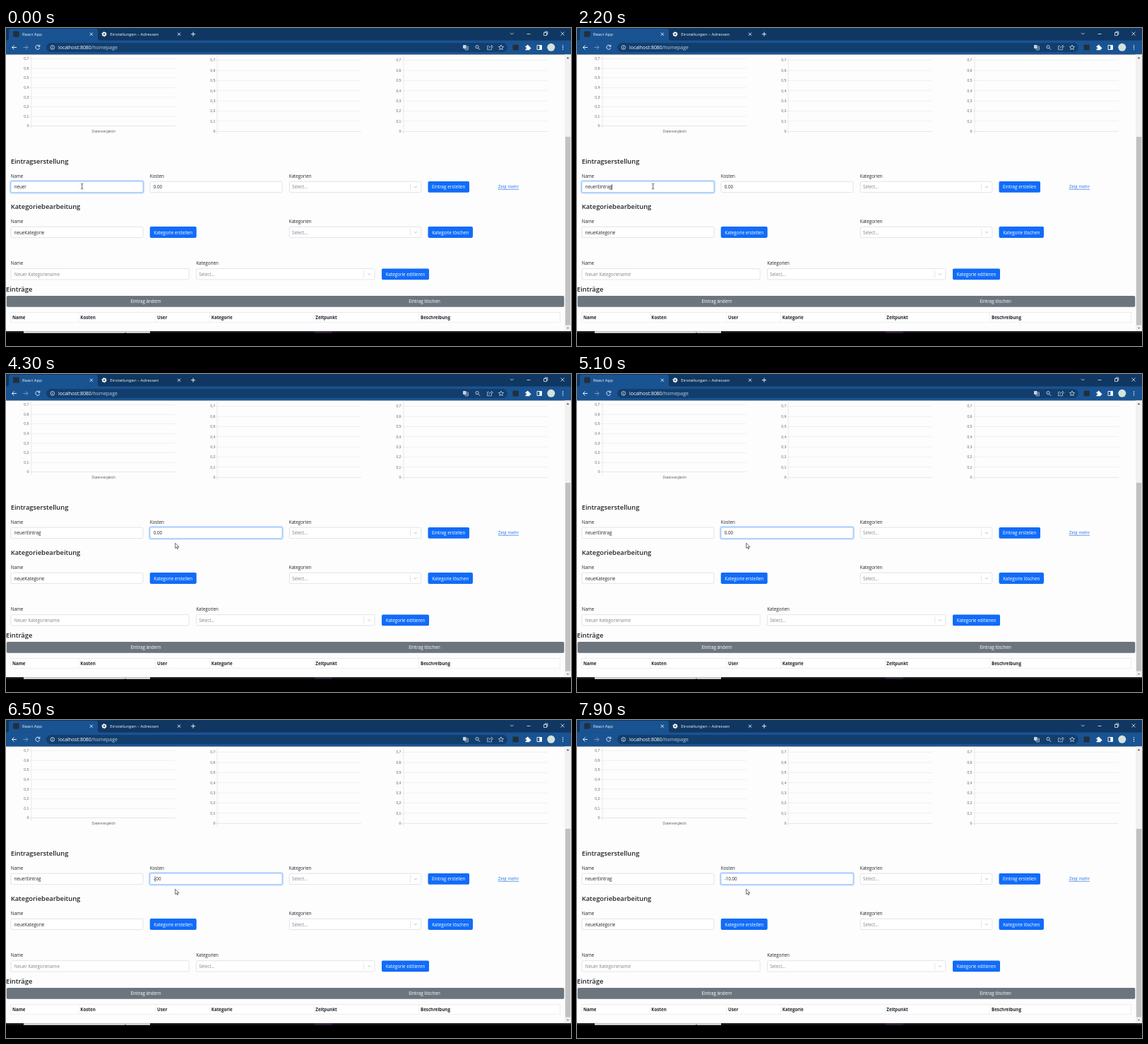
Animation, 800 px wide and 450 px high, one loop 8 s. Source, as an HTML page:

```html
<!DOCTYPE html>
<html lang="de">
<head>
<meta charset="utf-8">
<title>Eintragserstellung</title>
<style>
html, body { margin: 0; width: 100%; height: 100%; overflow: hidden; background: #000; }
svg { display: block; width: 800px; height: 450px; }
text { font: 6.25px "Open Sans", "Noto Sans", sans-serif; fill: #212529; white-space: pre; }
.head { font-size: 9.35px; font-weight: 600; }
.bold { font-size: 6.2px; font-weight: 700; }
.light { fill: #fff; }
.hint { fill: #808489; }
.link { fill: #2f78ee; text-decoration: underline .5px; }
.tab { font-size: 5.95px; fill: #f4f8fc; }
.url { font-size: 6.95px; fill: #fff; }
.axis { font: 5px "Liberation Sans", Arial, sans-serif; fill: #666; }
.mid { text-anchor: middle; }
.end { text-anchor: end; }
.icon { fill: none; stroke: #e4edf6; stroke-width: 1; }
</style>
</head>
<body>
<svg id="stage" viewBox="0 0 800 450"></svg>
<script>
const NS = "http://www.w3.org/2000/svg";
const stage = document.getElementById("stage");

function add(tag, attrs, content) {
  const el = document.createElementNS(NS, tag);
  for (const key in attrs) el.setAttribute(key, attrs[key]);
  if (content !== undefined) el.textContent = content;
  return stage.appendChild(el);
}
const box = (x, y, width, height, fill, more) => add("rect", { x, y, width, height, fill, ...more });
const text = (x, y, str, cls = "") => add("text", { x, y, class: cls }, str);
const icon = (d, more) => add("path", { d, class: "icon", ...more });
const dot = (cx, cy, r, fill) => add("circle", { cx, cy, r, fill });

function field(x, y, w, str, cls) {
  const frame = box(x + .25, y + .25, w - .5, 15.3, "#fff", { rx: 1.7, stroke: "#ced4da", "stroke-width": .6 });
  return { frame, label: text(x + 5, y + 10.4, str, cls) };
}
function select(x, y, w) {
  field(x, y, w, "Select...", "hint").label.setAttribute("x", x + 4);
  const right = x + w;
  box(right - 15.6, y + 3, .5, 10, "#ccc");
  icon(`M${right - 10} ${y + 7}l2 2l2 -2`, { style: "stroke:#bbb;stroke-width:.9" });
}
function button(x, y, w, str) {
  box(x, y, w, 15.8, "#116cf8", { rx: 1.8 });
  text(x + w / 2, y + 10.4, str, "light mid");
}

function browser() {
  box(0, 0, 800, 20, "#0f3761");
  add("path", { d: "M0 18Q4 18 4 14V4Q4 1 7 1H127Q130 1 130 4V14Q130 18 134 18Z", fill: "#1a5391" });
  box(0, 17.5, 800, 20, "#1a5391");
  box(57, 21, 653, 13, "#123e6e", { rx: 6.5 });

  box(10.2, 4.6, 8.4, 8.2, "#22303c", { rx: 1 });
  text(23, 11.2, "React App", "tab");
  add("circle", { cx: 139, cy: 8.7, r: 2, class: "icon", style: "stroke:#fff;stroke-width:1.7" });
  add("circle", { cx: 139, cy: 8.7, r: 3.2, class: "icon", "stroke-dasharray": "1.6 1.75" });
  text(147.3, 11.2, "Einstellungen – Adressen", "tab");
  for (const x of [120.8, 245]) icon(`M${x - 2} 6.7l4 4m0 -4l-4 4`);
  icon("M262 8.7h6m-3 -3v6");

  icon("M714 6.8l2.3 2.3l2.3 -2.3", { style: "stroke-width:.8" });
  icon("M737.5 8.5h5M761.5 6.5h4v4h-4zM763 6.3v-1.2h3.8v4h-1.2M785.5 5.5l5 5m0 -5l-5 5", { style: "stroke-width:.8" });

  icon("M15 27.5h-6.5m3 -3l-3 3l3 3");
  icon("M24.5 27.5h6.5m-3 -3l3 3l-3 3", { style: "stroke:#7897b8" });
  icon("M47.3 25.5a3 3 0 1 0 .4 2.8M47.8 23.8v2.5h-2.5");
  icon("M63 27.5a2.8 2.8 0 1 0 5.6 0a2.8 2.8 0 1 0 -5.6 0M65.8 27v2.2M65.8 25.4v.8", { style: "stroke-width:.8" });
  text(74, 30.2, "localhost:8080", "url").insertAdjacentHTML("beforeend", '<tspan fill="#bdcfe2">/homepage</tspan>');

  box(647, 24, 4.5, 5, "#c3d3e3", { rx: .7 });
  icon("M651 26h3.4v5h-4l-1 -2M651 28h2.3l-2 2.4", { style: "stroke-width:.6" });
  icon("M665 26.7a2.1 2.1 0 1 0 4.2 0a2.1 2.1 0 1 0 -4.2 0M668.6 28.3l2.6 2.6", { style: "stroke-width:.8" });
  icon("M684 25.5h-2.5v5.3h6v-2M683.5 29q.3 -3 4 -3v-1.6l2 2l-2 2v-1.4", { style: "stroke-width:.6" });
  icon("M701 24l1 2.3l2.5 .2l-1.9 1.7l.6 2.5l-2.2 -1.4l-2.2 1.4l.6 -2.5l-1.9 -1.7l2.5 -.2z", { style: "stroke-width:.7" });
  box(717.5, 23.4, 8.4, 8.2, "#22303c", { rx: 1 });
  icon("M735.5 25.5h2a1.2 1.2 0 1 1 2.2 0h1.8v2a1.2 1.2 0 1 1 0 2v1.7h-6v-1.8a1.1 1.1 0 1 0 0 -2z", { style: "fill:#fff;stroke:none" });
  icon("M752 24.5h6.5v6h-6.5z");
  box(755.3, 24.5, 3.2, 6, "#fff");
  dot(771.8, 27.3, 5.5, "#d5e3dc");
  for (const y of [25, 27.5, 30]) dot(788.5, y, .75, "#fff");
}

function chart(x0, x1, zero, step, left) {
  for (let i = 0; i < 8; i++) {
    const y = zero - i * step;
    box(x0 - 4, y - .25, x1 - x0 + 4, .5, i ? "#e3e3e3" : "#d0d0d0");
    text(left, y + 1.7, i ? "0," + i : "0", "axis end");
  }
  box(x0 - .25, 37.5, .5, zero - 33.5, "#d6d6d6");
}

function page() {
  box(0, 37.5, 800, 392, "#fdfdfd");
  chart(36, 240, 138.7, 13.6, 32.2);
  chart(299, 503, 146.2, 14.35, 296.2);
  chart(563, 767, 146.2, 14.35, 559.4);
  text(138.3, 147.8, "Datenvergleich", "axis mid");

  text(6.7, 191.5, "Eintragserstellung", "head");
  text(6.7, 211.5, "Name");
  text(203.7, 211.5, "Kosten");
  text(400.8, 211.5, "Kategorien");
  select(401, 217, 187);
  button(597.5, 217, 58.5, "Eintrag erstellen");
  text(696.7, 227.4, "Zeig mehr", "link");

  text(6.7, 255.9, "Kategoriebearbeitung", "head");
  text(6.7, 275.5, "Name");
  text(400.8, 275.5, "Kategorien");
  field(6.7, 281.1, 187.5, "neueKategorie");
  button(203.7, 281.1, 66, "Kategorie erstellen");
  select(401, 281.1, 187);
  button(597.5, 281.1, 63.5, "Kategorie löschen");

  text(6.7, 334.6, "Name");
  text(269.2, 334.6, "Kategorien");
  field(6.7, 340.4, 252.7, "Neuer Kategoriename", "hint");
  select(269.2, 340.4, 253);
  button(532, 340.4, 67, "Kategorie editieren");

  text(0, 372.8, "Einträge", "head");
  box(.8, 379, 789.5, 15.8, "#6c757d", { rx: 1.8 });
  text(198, 389.4, "Eintrag ändern", "light mid");
  text(592.5, 389.4, "Eintrag löschen", "light mid");

  box(6.9, 402.4, 777.8, 13.8, "#fff", { stroke: "#dee2e6", "stroke-width": .6 });
  const columns = [[9, "Name"], [105.3, "Kosten"], [214, "User"], [290.8, "Kategorie"], [438.3, "Zeitpunkt"], [587, "Beschreibung"]];
  columns.forEach(([x, name], i) => {
    if (i) box(x - 2.4, 402.4, .5, 13.8, "#dee2e6");
    text(x, 411.9, name, "bold");
  });

  box(791, 37.5, 9, 392, "#f1f1f1");
  box(792, 154, 7.2, 266.5, "#c1c1c1");
  add("path", { d: "M793.5 43.2l2 -2.2l2 2.2z", fill: "#505050" });
  add("path", { d: "M793.5 423.8l2 2.2l2 -2.2z", fill: "#8a8a8a" });

  box(0, 429.3, 800, 21, "#000");
  box(0, 429.3, 800, 2.3, "#1d1a20");
  box(25, 429.3, 179, 2.3, "#f4f4f4");
  box(168, 430.8, 2, .8, "#333");
  box(437, 429.3, 25, 2.2, "#3d2748");
}

browser();
page();

const fields = {
  name: field(6.7, 217, 187.5, "neuer"),
  cost: field(203.7, 217, 187.5, "0.00")
};
const ring = add("rect", { y: 216.17, width: 189.1, height: 17.4, rx: 2.5, fill: "none", stroke: "#0d6efd", "stroke-opacity": .27, "stroke-width": 1.67 });
const caret = box(0, 221, .6, 8, "#111");
const beam = add("path", { d: "M-1.6 -3.8Q-.2 -3.8 0 -3.2Q.2 -3.8 1.6 -3.8M0 -3.2V3.2M-1.6 3.8Q-.2 3.8 0 3.2Q.2 3.8 1.6 3.8", fill: "none", stroke: "#222", "stroke-width": .7 });
const arrow = add("path", { d: "M0 0V7.3L1.7 5.8L2.8 8.3L4 7.8L2.9 5.3H5.1Z", fill: "#fff", stroke: "#222", "stroke-width": .65 });

// time, focused field, its value, caret index
const edits = [
  [-600, "name", "neuer", 5], [300, "name", "neuerE", 6], [600, "name", "neuerEi", 7],
  [800, "name", "neuerEin", 8], [1200, "name", "neuerEint", 9], [1400, "name", "neuerEintr", 10],
  [1600, "name", "neuerEintra", 11], [1900, "name", "neuerEintrag", 12],
  [3500, "cost", "0.00", 1], [5400, "cost", ".00", 0], [6200, "cost", "-.00", 1],
  [6900, "cost", "-1.00", 2], [7200, "cost", "-10.00", 3]
];
// time, x, y of the pointer
const path = [[0, 107.7, 224], [2700, 107.7, 224], [3300, 236, 225], [3500, 236, 225], [3900, 239.7, 239.3], [8000, 239.7, 239.3]];

function pointerAt(t) {
  const i = path.findIndex((p, k) => k && t <= p[0]);
  const [t0, x0, y0] = path[i - 1], [t1, x1, y1] = path[i];
  const k = (t - t0) / (t1 - t0), e = k * k * (3 - 2 * k);
  return [x0 + (x1 - x0) * e, y0 + (y1 - y0) * e];
}

function draw(t) {
  const values = { name: "neuer", cost: "0.00" };
  let edit;
  for (const e of edits) if (e[0] <= t) { edit = e; values[e[1]] = e[2]; }
  const [since, focus, , index] = edit;

  for (const key in fields) {
    const { frame, label } = fields[key];
    if (label.textContent !== values[key]) label.textContent = values[key];
    frame.setAttribute("stroke", key === focus ? "#86b7fe" : "#ced4da");
  }
  const { frame, label } = fields[focus];
  ring.setAttribute("x", frame.x.baseVal.value - 1.05);
  const offset = index ? label.getSubStringLength(0, index) : 0;
  caret.setAttribute("x", label.x.baseVal[0].value + offset);
  caret.setAttribute("visibility", (t - since) % 1060 < 530 ? "visible" : "hidden");

  const [x, y] = pointerAt(t);
  const inside = y > 217 && y < 232.8 && (x < 194.2 || x > 203.7);
  beam.setAttribute("visibility", inside ? "visible" : "hidden");
  arrow.setAttribute("visibility", inside ? "hidden" : "visible");
  for (const el of [beam, arrow]) el.setAttribute("transform", `translate(${x} ${y})`);
}

const start = performance.now();
function tick() {
  draw(Math.floor((performance.now() - start) % 8000 / 100) * 100);
  requestAnimationFrame(tick);
}
tick();
</script>
</body>
</html>
```
